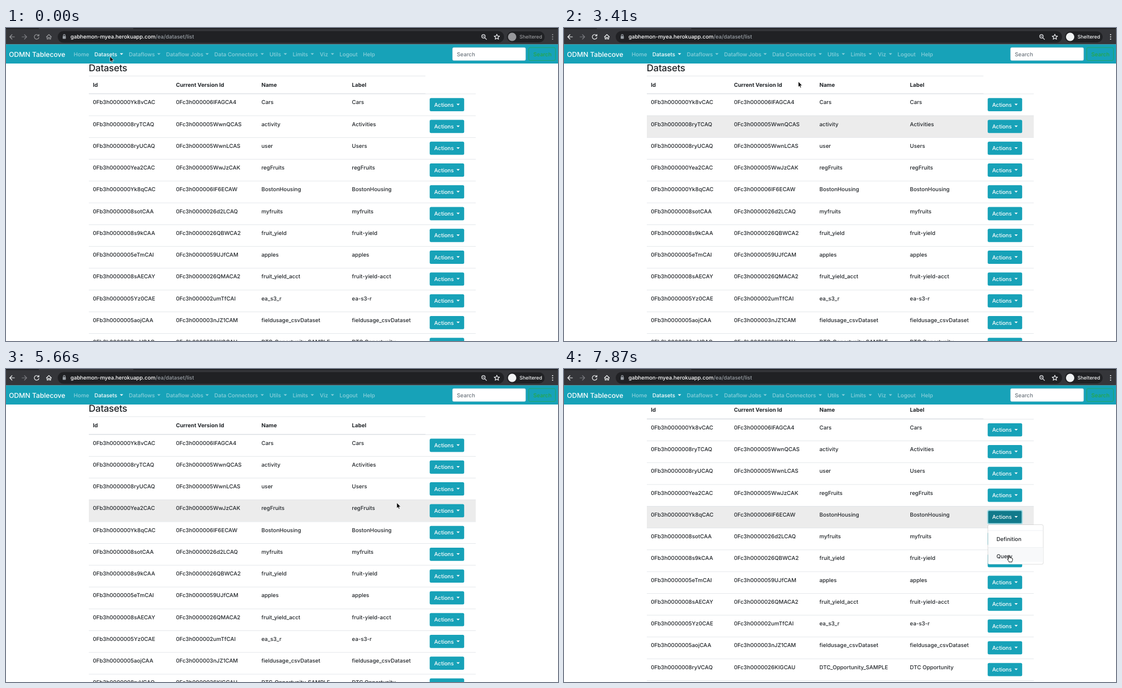
An HTML page that plays this animation: 993x564 px, repeating every 8 s.

```html
<!DOCTYPE html>
<html lang="en">
<head>
<meta charset="utf-8">
<title>Datasets</title>
<style>
  html, body { margin: 0; width: 100%; height: 100%; overflow: hidden; background: #fff; }
  svg { display: block; width: 100%; height: 100%; }
  text {
    font-family: Inter, Roboto, sans-serif; font-size: 9.77px; font-weight: 450;
    fill: #212529; white-space: pre; text-rendering: geometricPrecision;
  }
  .bold { font-weight: 700; }
  .title { font-size: 17.1px; font-weight: 500; letter-spacing: -.02em; }
  .brand { font-size: 12.2px; font-weight: 500; fill: #fff; }
  .link { fill: #8bd0db; }
  .white { fill: #fff; }
  .url { font-size: 9.6px; fill: #fff; }
  .path { fill: #9aa0a6; }
  .line { fill: #dee2e6; }
  .icon { fill: none; stroke-width: 1.2; stroke-linecap: round; stroke-linejoin: round; }
</style>
</head>
<body>
<svg id="stage" viewBox="0 0 993 564"></svg>
<script>
const LOOP = 8000, ROW_TOP = 118.4, PITCH = 39.26;
const BTN = { x: 762.2, dy: 7.9, w: 62, h: 23.8 };
const TEAL = '#17a2b8', TEAL_HOVER = '#138496', TEAL_ACTIVE = '#117a8b';

const rows = [
  ['0Fb3h000000Yk8vCAC', '0Fc3h000006IFAGCA4', 'Cars', 'Cars'],
  ['0Fb3h0000008ryTCAQ', '0Fc3h000005WwnQCAS', 'activity', 'Activities'],
  ['0Fb3h0000008ryUCAQ', '0Fc3h000005WwnLCAS', 'user', 'Users'],
  ['0Fb3h000000Yea2CAC', '0Fc3h000005WwJzCAK', 'regFruits', 'regFruits'],
  ['0Fb3h000000Yk8qCAC', '0Fc3h000006IF6ECAW', 'BostonHousing', 'BostonHousing'],
  ['0Fb3h0000008sotCAA', '0Fc3h0000026d2LCAQ', 'myfruits', 'myfruits'],
  ['0Fb3h0000008s9kCAA', '0Fc3h0000026QBWCA2', 'fruit_yield', 'fruit-yield'],
  ['0Fb3h0000005eTmCAI', '0Fc3h0000059UJfCAM', 'apples', 'apples'],
  ['0Fb3h0000008sAECAY', '0Fc3h0000026QMACA2', 'fruit_yield_acct', 'fruit-yield-acct'],
  ['0Fb3h0000005Yz0CAE', '0Fc3h000002umTfCAI', 'ea_s3_r', 'ea-s3-r'],
  ['0Fb3h0000005aojCAA', '0Fc3h000003nJZ1CAM', 'fieldusage_csvDataset', 'fieldusage_csvDataset'],
  ['0Fb3h0000008ryVCAQ', '0Fc3h0000026KIGCAU', 'DTC_Opportunity_SAMPLE', 'DTC Opportunity']
];
const columns = [156.2, 305.7, 459.5, 622.3];

// label, x, caret centre (0 = none)
const links = [
  ['Home', 121.8, 0], ['Datasets', 159, 207.8], ['Dataflows', 221, 275],
  ['Dataflow Jobs', 288, 361.8], ['Data Connectors', 374.8, 461], ['Utils', 474, 502.5],
  ['Limits', 515.7, 551], ['Viz', 564.5, 587.3], ['Logout', 600, 0], ['Help', 642.3, 0]
];

// pointer: time, x, y
const moves = [
  [0, 187, 51], [440, 194, 51], [530, 200, 50], [1060, 200, 58], [1150, 201, 70], [1240, 201, 78],
  [2060, 240, 165], [2150, 255, 187.5],
  [3410, 421.5, 96.5], [3530, 640, 126], [3610, 828, 139],
  [3880, 815, 138], [3970, 800, 136], [4060, 793, 137],
  [4510, 791, 147], [4600, 785, 178], [4690, 779, 200], [4770, 774, 242],
  [4860, 752, 250], [4950, 731, 247], [5040, 715, 244], [5130, 706, 242], [5210, 703, 241],
  [6200, 715, 249], [6300, 735, 257], [6410, 752, 263],
  [6490, 775, 267], [6580, 800, 268], [6670, 812, 267], [6760, 816, 267],
  [7380, 818, 273], [7520, 816, 283], [7610, 812, 300], [7700, 807, 318], [7790, 803, 330], [7870, 800.5, 335.5]
];
// page scroll: time, offset
const scrolls = [[0, 0], [5660, .7], [5750, 6], [5840, 16], [5920, 24], [5990, 27.8], [6110, 28.5]];

const rect = (x, y, w, h, fill, extra = '') =>
  `<rect x="${x}" y="${y}" width="${w}" height="${h}" fill="${fill}" ${extra}/>`;
const label = (x, y, str, cls = '') => `<text x="${x}" y="${y}" class="${cls}">${str}</text>`;
const caret = (cx, y, fill) => `<path d="M${cx - 3} ${y}h6l-3 3z" fill="${fill}"/>`;
const icon = (d, id = '', tone = 'tone') => `<path class="icon ${tone}" ${id && `id="${id}"`} d="${d}"/>`;
const rowY = i => ROW_TOP + i * PITCH;

function browserBar() {
  return rect(0, 0, 993, 29.3, '#35363a') +
    rect(0, 0, 59, 2, '#202124') + rect(229, 0, 764, 2, '#202124') +
    rect(93, 5.5, 803, 21, '#202124', 'rx="10.5"') +
    rect(901, 6, 68, 20, '#202124', 'rx="10"') +
    icon('M15.2 16H6.8M10.8 12L6.8 16L10.8 20') +
    icon('M28.8 16H37.2M33.2 12L37.2 16L33.2 20', '', 'dim') +
    icon('M58.3 13.2A4.2 4.2 0 1 0 59.2 17M59.2 11.6V14.2H56.5', 'reload') +
    icon('M51.5 12.5L58.5 19.5M58.5 12.5L51.5 19.5', 'stop') +
    icon('M72.8 16L77.2 11.8L81.6 16M74 15.2V20H76V17.2H78.4V20H80.4V15.2') +
    rect(102, 14.6, 5.6, 4.8, '#9aa0a6', 'rx=".6"') +
    '<path class="icon" stroke="#9aa0a6" d="M103.2 14.5V13.2A1.6 1.6 0 0 1 106.4 13.2V14.5"/>' +
    `<text x="116" y="19.3" class="url">gabhemon-myea.herokuapp.com<tspan class="path">/ea/dataset/list</tspan></text>` +
    '<path class="icon" stroke="#e8eaed" d="M862 15A3.1 3.1 0 1 1 855.8 15A3.1 3.1 0 1 1 862 15M861.2 17.4L864.4 20.6M857.6 15H860.2"/>' +
    '<path class="icon" stroke="#e8eaed" d="M883 11.2L884.4 14.4L887.8 14.7L885.2 17L886 20.3L883 18.5L880 20.3L880.8 17L878.2 14.7L881.6 14.4Z"/>' +
    '<circle class="toneFill" cx="910.5" cy="16" r="7.5"/>' +
    '<text class="toneFill" x="923.8" y="19.3" style="font-size:8.9px;font-weight:500">Sheltered</text>' +
    [12, 16, 20].map(y => `<circle class="toneFill" cx="983.3" cy="${y}" r="1.1"/>`).join('');
}

function navBar() {
  const items = links.map(([name, x, cx]) => {
    const on = name === 'Datasets';
    return label(x, 50.8, name, on ? 'white' : 'link') + (cx ? caret(cx, 45.4, on ? '#fff' : '#8bd0db') : '');
  }).join('');
  return rect(0, 29.3, 993, 34.7, TEAL) + label(5.2, 51.5, 'ODMN Tablecove', 'brand') + items +
    rect(803.2, 35.2, 131.6, 23.3, '#fff', 'rx="2.5" stroke="#ced4da" stroke-width=".6"') +
    '<text x="811" y="50.8" style="fill:#6c757d">Search</text>' +
    rect(940.4, 35.2, 48, 23.3, 'none', 'rx="2.5" stroke="#28a745" stroke-width=".7"') +
    '<text x="948.5" y="50.8" style="fill:#28a745">Search</text>';
}

function tableRow(cells, i) {
  const y = rowY(i), by = y + BTN.dy;
  return rect(149, y, 696, PITCH, 'none', 'class="band"') +
    rect(149, y, 696, .8, '', 'class="line"') +
    cells.map((c, k) => label(columns[k], y + 18.9, c)).join('') +
    rect(BTN.x, by, BTN.w, BTN.h, TEAL, 'rx="2.5" class="btn"') +
    label(770.2, by + 15.6, 'Actions', 'white') + caret(813.3, by + 10.2, '#fff');
}

function table() {
  return label(148.8, 77.6, 'Datasets', 'title') +
    rect(149, 86.2, 605.5, .8, '', 'class="line"') +
    ['Id', 'Current Version Id', 'Name', 'Label'].map((h, k) => label(columns[k], 105.6, h, 'bold')).join('') +
    rows.map(tableRow).join('') +
    rect(149, ROW_TOP - .7, 605.5, 1.3, '', 'class="line"') +
    rect(149, rowY(rows.length), 696, .8, '', 'class="line"');
}

const panel = (x, y, w, h) => rect(x, y, w, h, '#fff', 'rx="2.5" stroke="#000" stroke-opacity=".17" stroke-width=".8"');

const stage = document.getElementById('stage');
stage.innerHTML = rect(0, 0, 993, 564, '#fff') +
  `<g id="page">${table()}</g>` +
  `<g id="actions">${panel(762.5, 280.5, 99.6, 71.4)}
    ${rect(763, 291.5, 98.8, 29.5, '#f8f9fa', 'id="overDefinition"')}${rect(763, 322, 98.8, 25.5, '#f8f9fa', 'id="overQuery"')}
    ${rect(763, 290.7, 98.8, .7, '#e9ecef')}${rect(763, 321.2, 98.8, .7, '#e9ecef')}
    ${label(778, 309.9, 'Definition')}${label(778, 340.6, 'Query')}</g>` +
  navBar() +
  `<g id="menu">${panel(154.4, 61.2, 99.4, 29.6)}${rect(154.8, 66, 98.6, 20, '#fff', 'id="item"')}
    <text id="itemText" x="169.6" y="79.5">List</text></g>` +
  browserBar() +
  rect(991.7, 0, 1.3, 274, '#6b6b6b', 'id="thumb"') +
  `<path id="arrow" fill="#000" stroke="#fff" stroke-width=".7" d="M0 0V10L2.2 7.9L3.7 11.3L5.3 10.6L3.9 7.3H7Z"/>
   <path id="hand" fill="#fff" stroke="#000" stroke-width=".9" stroke-linejoin="round"
     d="M-1 1Q0 -.6 1 1V4.6Q2.2 3.8 3 5Q4.2 4.3 4.9 5.5Q6.4 5 6.4 6.8V8.6Q6.2 10 5.4 11V12.3H-.2V11.2Q-1.8 9.4 -3 7.2Q-2.6 5.8 -1 7.4Z"/>`;

const $ = id => document.getElementById(id);
const bands = [...stage.querySelectorAll('.band')], btns = [...stage.querySelectorAll('.btn')];
const show = (id, on) => $(id).setAttribute('visibility', on ? 'visible' : 'hidden');
const lastIndex = (list, t) => list.findLastIndex(k => k[0] <= t);
stage.querySelectorAll('.dim').forEach(e => e.setAttribute('stroke', '#7d7e82'));

function rowAt([, x, y], scroll) {
  const i = Math.floor((y + scroll - ROW_TOP) / PITCH);
  return x >= 149 && x <= 845 && y > 64 ? i : -1;
}
function buttonAt(p, scroll) {
  const i = rowAt(p, scroll), dy = p[2] + scroll - rowY(i) - BTN.dy;
  return p[1] >= BTN.x && p[1] <= BTN.x + BTN.w && dy >= 0 && dy <= BTN.h ? i : -1;
}

function draw(t) {
  const scroll = scrolls[lastIndex(scrolls, t)][1];
  const k = lastIndex(moves, t), now = moves[k];
  const clicked = t >= 7020, open = t >= 7110;

  // hover feedback trails the pointer by a step or two
  const hotRow = clicked ? 4 : rowAt(moves[Math.max(0, k - 1)], scroll);
  const hotBtn = clicked ? 4 : buttonAt(moves[Math.max(0, k - 2)], scroll);
  bands.forEach((b, i) => b.setAttribute('fill', i === hotRow ? '#ececec' : 'none'));
  btns.forEach((b, i) => {
    const active = clicked && i === 4;
    b.setAttribute('fill', active ? TEAL_ACTIVE : i === hotBtn ? TEAL_HOVER : TEAL);
    b.setAttribute('stroke', active ? '#9cd7e1' : 'none');
    b.setAttribute('stroke-width', 2);
  });
  $('page').setAttribute('transform', `translate(0 ${-scroll})`);
  show('page', t < 1970 || t >= 2060);

  const tone = t < 150 ? '#97989b' : '#f1f3f4';
  stage.querySelectorAll('.tone').forEach(e => e.setAttribute('stroke', tone));
  stage.querySelectorAll('.toneFill').forEach(e => e.style.fill = tone);
  const loading = t >= 1500 && t < 2330;
  show('reload', !loading);
  show('stop', loading);

  show('menu', t >= 880 && t < 1970);
  $('item').setAttribute('fill', t >= 1420 ? '#007bff' : t >= 1150 ? '#f8f9fa' : '#fff');
  $('itemText').style.fill = t >= 1420 ? '#fff' : '#212529';

  show('actions', open);
  const inMenu = open && now[2] > 291;
  $('overDefinition').setAttribute('opacity', inMenu && now[2] < 321 ? 1 : 0);
  $('overQuery').setAttribute('opacity', inMenu && now[2] >= 321 ? 1 : 0);

  const fade = t < 5750 ? 0 : Math.min(1, Math.max(0, (6760 - t) / 300));
  $('thumb').setAttribute('y', 31.5 + scroll * .51);
  $('thumb').setAttribute('opacity', fade);

  const hand = (t >= 530 && t < 1970) || clicked || buttonAt(now, scroll) >= 0;
  show('hand', hand);
  show('arrow', !hand);
  $(hand ? 'hand' : 'arrow').setAttribute('transform', `translate(${now[1]} ${now[2]})`);
}

const start = performance.now();
function tick() {
  draw((performance.now() - start) % LOOP);
  requestAnimationFrame(tick);
}
tick();
</script>
</body>
</html>
```
